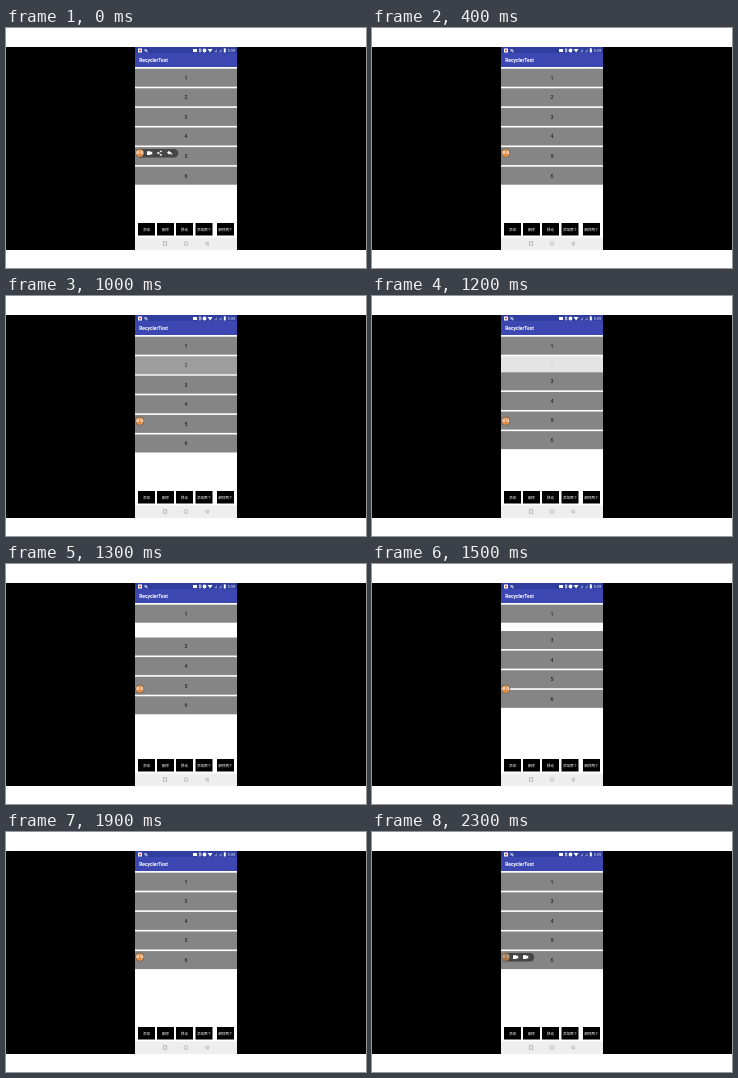
Recreate the animation shown at these times as an HTML page. Size 360 by 240 pixels, loop 2400 ms.

```html
<!DOCTYPE html>
<html lang="en">
<head>
<meta charset="utf-8">
<title>RecyclerTest</title>
<style>
  html, body { margin: 0; width: 100%; height: 100%; overflow: hidden; background: #fff; }
  svg { display: block; width: 100vw; height: 100vh; }
  text { font-family: Roboto, "Noto Sans CJK SC", "Noto Sans CJK", sans-serif; }
  .mid { text-anchor: middle; }
</style>
</head>
<body>
<svg viewBox="0 0 360 240">
  <rect y="19" width="360" height="203"/>
  <rect x="129" y="19" width="102" height="203" fill="#fff"/>
  <rect x="129" y="19" width="102" height="6" fill="#303f9f"/>
  <rect x="129" y="25" width="102" height="14" fill="#3c47b2"/>
  <text x="133.2" y="34" font-size="4.9" font-weight="700" fill="#fff">RecyclerTest</text>

  <g fill="#fff">
    <rect x="132" y="20.5" width="4" height="4"/>
    <circle cx="134" cy="22.5" r="1" fill="#d33"/>
    <path d="M138.4 21h2.4v2.6h-2.4zM140 22.4h1.6v1.8H140z" fill="#aab2de"/>
    <path d="M187 21h4v3h-4z"/>
    <path d="M193 21l2 2.4-1 1v-4l1 1-2 2.4" fill="none" stroke="#fff" stroke-width=".6"/>
    <circle cx="198.5" cy="22.5" r="1.9"/>
    <path d="M201.6 21h5l-2.5 3.4z"/>
    <path d="M208 24.2l3-3.4v3.4zM212.6 24.2l3-3.4v3.4z" fill="#7c87c6"/>
    <rect x="217.8" y="20.4" width="2" height="4"/>
    <text x="221.8" y="24" font-size="3.8">5:39</text>
  </g>

  <g id="list"></g>
  <g id="buttons"></g>

  <rect x="129" y="209.5" width="102" height="12.5" fill="#eee"/>
  <g fill="none" stroke="#999" stroke-width=".6">
    <rect x="157.4" y="213.8" width="3.4" height="3.4"/>
    <circle cx="180" cy="215.6" r="1.9"/>
    <path d="M202.2 213.8v3.6l-3-1.8z"/>
  </g>

  <rect id="pill" x="130" y="121" height="8.4" rx="4.2" fill="#454545"/>
  <g id="icons" fill="#fff">
    <path d="M141 123.3h3.6v1l1.6-.8v3.2l-1.6-.8v1H141z"/>
    <g stroke="#fff" stroke-width=".6">
      <path d="M155 123.3l-3 1.8 3 1.8" fill="none"/>
      <circle cx="155" cy="123.3" r=".6"/><circle cx="152" cy="125.1" r=".6"/><circle cx="155" cy="126.9" r=".6"/>
    </g>
    <path d="M161 124.6l2.4-2.2v1.4q2.6.2 3 3.4-1.2-1.6-3-1.6v1.4z"/>
  </g>
  <path id="camera" d="M151 123.3h3.6v1l1.6-.8v3.2l-1.6-.8v1H151z" fill="#fff"/>
  <g id="badge">
    <circle cx="133.8" cy="125.1" r="4" fill="#e5822f" stroke="#5c4a3a" stroke-width=".7"/>
    <circle cx="133.8" cy="125.1" r="3.3" fill="none" stroke="#f6cfa8" stroke-width=".5"/>
    <text class="mid" x="133.8" y="126.1" font-size="2.7" font-weight="700" fill="#fff">00:03</text>
  </g>
</svg>
<script>
const $ = id => document.getElementById(id);
const LOOP = 2400, STEP = 100, PITCH = 19.6;

$("list").innerHTML = [2, 1, 3, 4, 5, 6].map(n => {
  const y = 40.7 + PITCH * (n - 1);
  return `<g id="row${n}"><rect x="129" y="${y}" width="102" height="18" fill="#858585"/>
    <text class="mid" x="180" y="${y + 10.9}" font-size="5.3" fill="#111">${n}</text></g>`;
}).join("");

$("buttons").innerHTML = [["添加", 132], ["删除", 151], ["移动", 170], ["添加两个", 189.5], ["删除两个", 211]]
  .map(([label, x]) => `<rect x="${x}" y="195" width="17" height="12.5"/>
    <text class="mid" x="${x + 8.5}" y="202.6" font-size="3.5" font-weight="500" fill="#fff">${label}</text>`).join("");

// Right edge of the floating menu while it is open
const menuEdge = { 0: 172.3, 100: 168, 200: 158, 300: 146, 2200: 150, 2300: 162.3 };
const clamp = v => Math.min(1, Math.max(0, v));
const show = (el, on) => el.setAttribute("visibility", on ? "visible" : "hidden");

function draw(now) {
  const t = Math.floor(now % LOOP / STEP) * STEP;

  const rise = PITCH * (1 - Math.cos(Math.PI * clamp((t - 938) / 935))) / 2;
  $("row2").setAttribute("opacity", 1 - clamp((t - 930) / 345));
  for (let n = 3; n <= 6; n++) $("row" + n).setAttribute("transform", `translate(0 ${-rise})`);

  const edge = menuEdge[t] || 0, opening = t >= 2200;
  $("pill").setAttribute("width", Math.max(0, edge - 130));
  [...$("icons").children].forEach((icon, i) =>
    show(icon, edge > 149 + 10 * i && !(opening && i)));
  show($("camera"), opening && edge > 160);
  $("badge").setAttribute("opacity", opening ? 0.65 : 1);

  requestAnimationFrame(draw);
}
requestAnimationFrame(draw);
</script>
</body>
</html>
```
